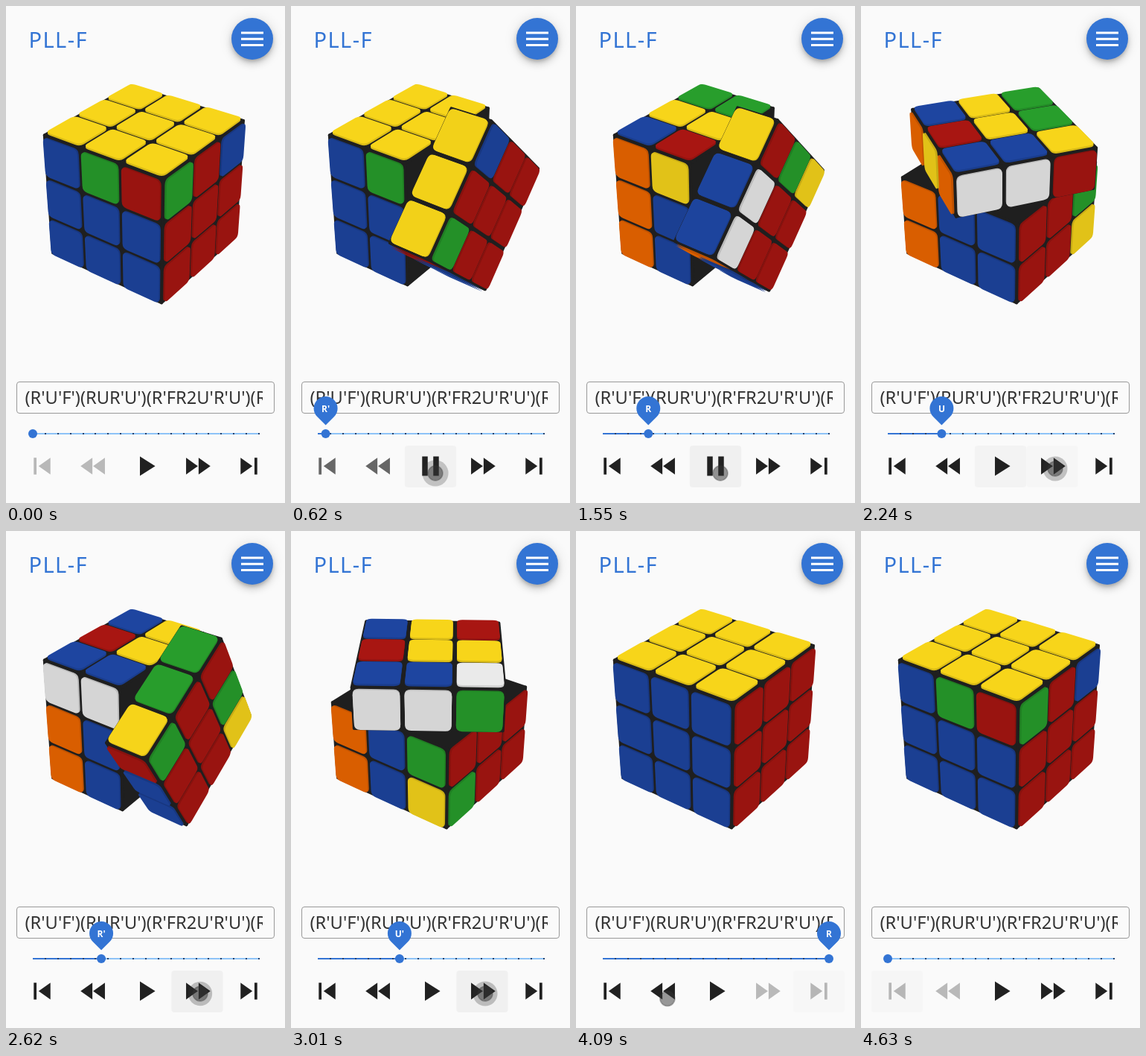
An HTML page with a canvas that plays this animation: 375 px wide and 667 px high, repeating every 5.18 s.

```html
<!DOCTYPE html>
<html lang="en">
<head>
<meta charset="utf-8">
<title>PLL-F</title>
<style>
  html, body { margin: 0; width: 100%; height: 100%; overflow: hidden; background: #fafafa; }
  #stage { position: absolute; left: 0; top: 0; width: 375px; height: 667px; overflow: hidden; }
  canvas, svg { position: absolute; left: 0; top: 0; display: block; }
  text { font-family: "Noto Sans", "Open Sans", sans-serif; }
  #menu {
    position: absolute; left: 303px; top: 16px; width: 56px; height: 56px;
    border-radius: 50%; background: #3374d4;
    box-shadow: 0 3px 5px -1px rgba(0,0,0,.2), 0 6px 10px rgba(0,0,0,.14), 0 1px 18px rgba(0,0,0,.12);
  }
</style>
</head>
<body>
<div id="stage">
  <canvas id="cube" width="375" height="667"></canvas>
  <div id="menu"></div>
  <svg width="375" height="667" viewBox="0 0 375 667">
    <defs><clipPath id="field"><rect x="25" y="506" width="320" height="40"/></clipPath></defs>
    <text x="30.5" y="56" font-size="29" letter-spacing="1.4" fill="#3374d4">PLL-F</text>
    <path d="M316 34.5h30v3h-30zm0 8.2h30v3h-30zm0 8.3h30v3h-30z" fill="#fff"/>
    <rect x="14.5" y="504.5" width="346" height="42" rx="3.5" fill="none" stroke="#999"/>
    <text x="25.5" y="534" font-size="23.65" fill="#333" clip-path="url(#field)">(R'U'F')(RUR'U')(R'FR2U'R'U')(RUR'UR)</text>
    <g id="buttons" fill="#212121"></g>
    <rect x="36" y="573" width="304" height="2" fill="#8dc3f7"/>
    <rect id="fill" x="36" y="573" height="2" fill="#3374d4"/>
    <g id="ticks" fill="#24406c"></g>
    <g id="thumb" fill="#3374d4">
      <circle cy="574" r="6"/>
      <g id="label">
        <path d="M0 562.6L-11.3 551.3A16 16 0 1 1 11.3 551.3Z"/>
        <text id="name" y="544.5" font-size="12" font-weight="600" fill="#fff" text-anchor="middle"></text>
      </g>
    </g>
    <g id="pointer" fill="#333">
      <circle id="halo"/>
      <circle r="10" fill-opacity=".5" stroke="#333" stroke-opacity=".35" stroke-width="1.5"/>
    </g>
  </svg>
</div>
<script>
const LOOP = 5180, TURN = 300, SLIDE = 300;
const $ = id => document.getElementById(id);
const clamp = x => Math.max(0, Math.min(1, x));
const lerp = (a, b, k) => a + (b - a) * k;
const inOut = x => x < .5 ? 2 * x * x : 1 - 2 * (1 - x) * (1 - x);

// CSS "ease": cubic-bezier(.25, .1, .25, 1)
function ease(x) {
  let lo = 0, hi = 1;
  const bez = (a, b, u) => 3 * a * u * (1 - u) ** 2 + 3 * b * u * u * (1 - u) + u ** 3;
  for (let i = 0; i < 18; i++) {
    const mid = (lo + hi) / 2;
    if (bez(.25, .25, mid) < x) lo = mid; else hi = mid;
  }
  return bez(.1, 1, lo);
}

// ---- cube model ----
const MOVES = "R' U' F' R U R' U' R' F R2 U' R' U' R U R' U R".split(" ");
const AXIS = { R: 0, U: 1, F: 2 };
const COLORS = [
  [[168, 22, 18], [238, 103, 0]],    // right, left
  [[247, 213, 26], [234, 234, 234]], // up, down
  [[30, 69, 160], [40, 158, 44]]     // front, back
];

function rotate(v, k, a) {
  const i = (k + 1) % 3, j = (k + 2) % 3, c = Math.cos(a), s = Math.sin(a), w = v.slice();
  w[i] = v[i] * c - v[j] * s;
  w[j] = v[i] * s + v[j] * c;
  return w;
}
const angleOf = m => (m[1] === "'" ? 1 : m[1] === "2" ? -2 : -1) * Math.PI / 2;

function turn(stickers, axis, angle) {
  const spin = v => rotate(v, axis, angle).map(Math.round);
  return stickers.map(s => s.p[axis] === 1 ? { p: spin(s.p), n: spin(s.n), c: s.c } : s);
}

const solved = [];
for (let k = 0; k < 3; k++)
  for (const side of [1, -1])
    for (let a = -1; a <= 1; a++)
      for (let b = -1; b <= 1; b++) {
        const p = [0, 0, 0], n = [0, 0, 0];
        p[k] = n[k] = side;
        p[(k + 1) % 3] = a;
        p[(k + 2) % 3] = b;
        solved.push({ p, n, c: COLORS[k][side > 0 ? 0 : 1] });
      }

const states = [];
states[MOVES.length] = solved;
for (let i = MOVES.length; i > 0; i--)
  states[i - 1] = turn(states[i], AXIS[MOVES[i - 1][0]], -angleOf(MOVES[i - 1]));

// ---- camera ----
const AZ = 36 * Math.PI / 180, EL = 31.6 * Math.PI / 180, DIST = 12.03, FOCAL = 1124;
const [sa, ca, se, ce] = [Math.sin(AZ), Math.cos(AZ), Math.sin(EL), Math.cos(EL)];
const dot = (a, b) => a[0] * b[0] + a[1] * b[1] + a[2] * b[2];
const RIGHT = [ca, 0, -sa], UP = [-sa * se, ce, -ca * se], EYE = [sa * ce, se, ca * ce];

function project(p) {
  const f = FOCAL / (DIST - dot(p, EYE));
  return [187.5 + f * dot(p, RIGHT), 245 - f * dot(p, UP)];
}
const faces = (n, p) => dot(n, EYE) * DIST > dot(n, p);

// ---- cube drawing ----
const ctx = $("cube").getContext("2d");
const INSET = .02, HALF = .303, ROUND = .08, RAISE = .028;
const SIDES = [[-1, -1], [1, -1], [1, 1], [-1, 1]];

function drawBody(lo, hi, spin) {
  ctx.fillStyle = ctx.strokeStyle = "#1f1f1f";
  ctx.lineJoin = "round";
  ctx.lineWidth = INSET * 195;
  for (let k = 0; k < 3; k++)
    for (const side of [1, -1]) {
      const n = [0, 0, 0];
      n[k] = side;
      const pts = SIDES.map(([a, b]) => {
        const d = [0, 0, 0];
        d[k] = side; d[(k + 1) % 3] = a; d[(k + 2) % 3] = b;
        return spin(d.map((s, i) => s > 0 ? hi[i] - INSET : lo[i] + INSET));
      });
      if (!faces(spin(n), pts[0])) continue;
      ctx.beginPath();
      pts.map(project).forEach(q => ctx.lineTo(q[0], q[1]));
      ctx.closePath();
      ctx.fill();
      ctx.stroke();
    }
}

function roundedFace(s, height, spin) {
  const k = s.n.findIndex(Boolean);
  const at = (a, b) => {
    const v = s.p.map((x, i) => x * 2 / 3 + s.n[i] * (1 / 3 + height));
    v[(k + 1) % 3] += a;
    v[(k + 2) % 3] += b;
    return project(spin(v));
  };
  const r = HALF - ROUND;
  ctx.beginPath();
  SIDES.forEach(([a, b], i) => {
    const near = at(a * HALF, b * r), far = at(a * r, b * HALF), tip = at(a * HALF, b * HALF);
    const [from, to] = i % 2 ? [far, near] : [near, far];
    ctx.lineTo(from[0], from[1]);
    ctx.quadraticCurveTo(tip[0], tip[1], to[0], to[1]);
  });
  ctx.closePath();
  ctx.fill();
}

function drawSticker(s, spin) {
  const n = spin(s.n);
  if (!faces(n, spin(s.p.map((x, i) => x * 2 / 3 + s.n[i] / 3)))) return;
  const light = .91 + .09 * clamp(n[1] * 1.1);
  const tint = k => `rgb(${s.c.map(v => Math.round(v * light * k))})`;
  ctx.fillStyle = tint(.88);
  roundedFace(s, 0, spin);
  roundedFace(s, RAISE / 2, spin);
  ctx.fillStyle = tint(1);
  roundedFace(s, RAISE, spin);
}

function drawCube(done, progress) {
  const stickers = states[done], still = v => v;
  const lo = [-1, -1, -1], hi = [1, 1, 1];
  ctx.clearRect(0, 0, 375, 667);
  if (!progress) {
    drawBody(lo, hi, still);
    stickers.forEach(s => drawSticker(s, still));
    return;
  }
  const move = MOVES[done], k = AXIS[move[0]], angle = angleOf(move) * progress;
  const spin = v => rotate(v, k, angle);
  const cut = (v, x) => v.map((y, i) => i === k ? x : y);
  // every turning layer faces the camera, so it goes on top
  drawBody(lo, cut(hi, 1 / 3), still);
  stickers.filter(s => s.p[k] < 1).forEach(s => drawSticker(s, still));
  drawBody(cut(lo, 1 / 3), hi, spin);
  stickers.filter(s => s.p[k] === 1).forEach(s => drawSticker(s, spin));
}

// ---- controls ----
const ICONS = [
  "M6 6h2v12H6zm3.5 6l8.5 6V6z",
  "M11 18V6l-8.5 6 8.5 6zm.5-6l8.5 6V6l-8.5 6z",
  "M8 5v14l11-7z",
  "M4 18l8.5-6L4 6v12zm9-12v12l8.5-6L13 6z",
  "M6 18l8.5-6L6 6v12zM16 6v12h2V6h-2z"
];
const PAUSE = "M6 19h4V5H6v14zm8-14v14h4V5h-4z";
$("buttons").innerHTML = ICONS.map((d, i) => {
  const x = 48.5 + i * 69.5;
  return `<rect x="${x - 34.7}" y="590" width="69.4" height="56" rx="4" fill="#000"/>
    <path d="${d}" transform="translate(${x} 617.5) scale(1.87) translate(-12 -12)"/>`;
}).join("");
const plates = $("buttons").querySelectorAll("rect");
const icons = $("buttons").querySelectorAll("path");

const stepX = v => 36 + v * 304 / MOVES.length;
$("ticks").innerHTML = MOVES.map((m, i) =>
  `<rect x="${Math.round(stepX(i + 1)) - 1}" y="573" width="2" height="2"/>`).join("");

// ---- timeline ----
const STEPS = [
  { at: 470, to: 1 }, { at: 780, to: 2 }, { at: 1090, to: 3 }, { at: 1400, to: 4 },
  { at: 2112, to: 5, lag: 70 }, { at: 2498, to: 6 }, { at: 2880, to: 7 },
  { at: 3440, to: 18, jump: true }, { at: 4285, to: 0, jump: true }
];
const PLAYED = 470, PAUSED = 1600;
const CLICKS = [PLAYED, PAUSED, 2112, 2498, 2880, 3440, 4275];
// start, end, x, y
const PATH = [
  [0, 370, 194, 627], [1720, 2070, 261, 621], [3180, 3430, 324, 622],
  [3830, 4260, 33, 630], [4330, 4600, 33, 637]
];
// button, fade-in start, its length, fade-out start, its length
const GLOWS = [
  [2, PLAYED, 200, 2112, 400], [3, 2112, 300, 3200, 400],
  [4, 3440, 200, 3880, 300], [0, 4285, 100, 4400, 400]
];

function drawControls(t, value, thumbX) {
  $("thumb").setAttribute("transform", `translate(${thumbX} 0)`);
  $("fill").setAttribute("width", Math.max(0, thumbX - 36));
  $("label").style.display = value ? "" : "none";
  $("name").textContent = value ? MOVES[value - 1] : "";

  const fade = from => clamp((t - from) / 280);
  const prev = fade(PLAYED) - fade(4285), next = 1 - fade(3440) + fade(4285);
  [prev, prev, 1, next, next].forEach((k, i) => icons[i].setAttribute("opacity", lerp(.3, 1, k)));
  icons[2].setAttribute("d", t >= PLAYED && t < PAUSED ? PAUSE : ICONS[2]);

  plates.forEach(p => p.setAttribute("opacity", 0));
  for (const [i, a, la, b, lb] of GLOWS)
    plates[i].setAttribute("opacity", .04 * clamp((t - a) / la) * (1 - clamp((t - b) / lb)));
}

function drawPointer(t) {
  let x = 240, y = 688;
  for (const [a, b, px, py] of PATH) {
    const k = inOut(clamp((t - a) / (b - a)));
    x = lerp(x, px, k);
    y = lerp(y, py, k);
  }
  $("pointer").setAttribute("transform", `translate(${x} ${y})`);
  $("pointer").setAttribute("opacity", 1 - clamp((t - 4330) / 230));
  const click = CLICKS.filter(c => c <= t).pop();
  const k = click === undefined ? 1 : clamp((t - click) / 200);
  $("halo").setAttribute("r", 10 + 10 * k);
  $("halo").setAttribute("opacity", k < 1 ? .4 * (1 - k * .5) : 0);
}

function render(t) {
  let value = 0, done = 0, progress = 0, thumbX = stepX(0);
  for (const s of STEPS) {
    if (t < s.at) break;
    value = done = s.to;
    progress = 0;
    if (!s.jump && t < s.at + TURN) {
      done = s.to - 1;
      progress = inOut((t - s.at) / TURN);
    }
    thumbX = lerp(thumbX, stepX(value), ease(clamp((t - s.at - (s.lag || 42)) / SLIDE)));
  }
  drawCube(done, progress);
  drawControls(t, value, thumbX);
  drawPointer(t);
}

const start = performance.now();
function tick() {
  render((performance.now() - start) % LOOP);
  requestAnimationFrame(tick);
}
tick();
</script>
</body>
</html>
```
